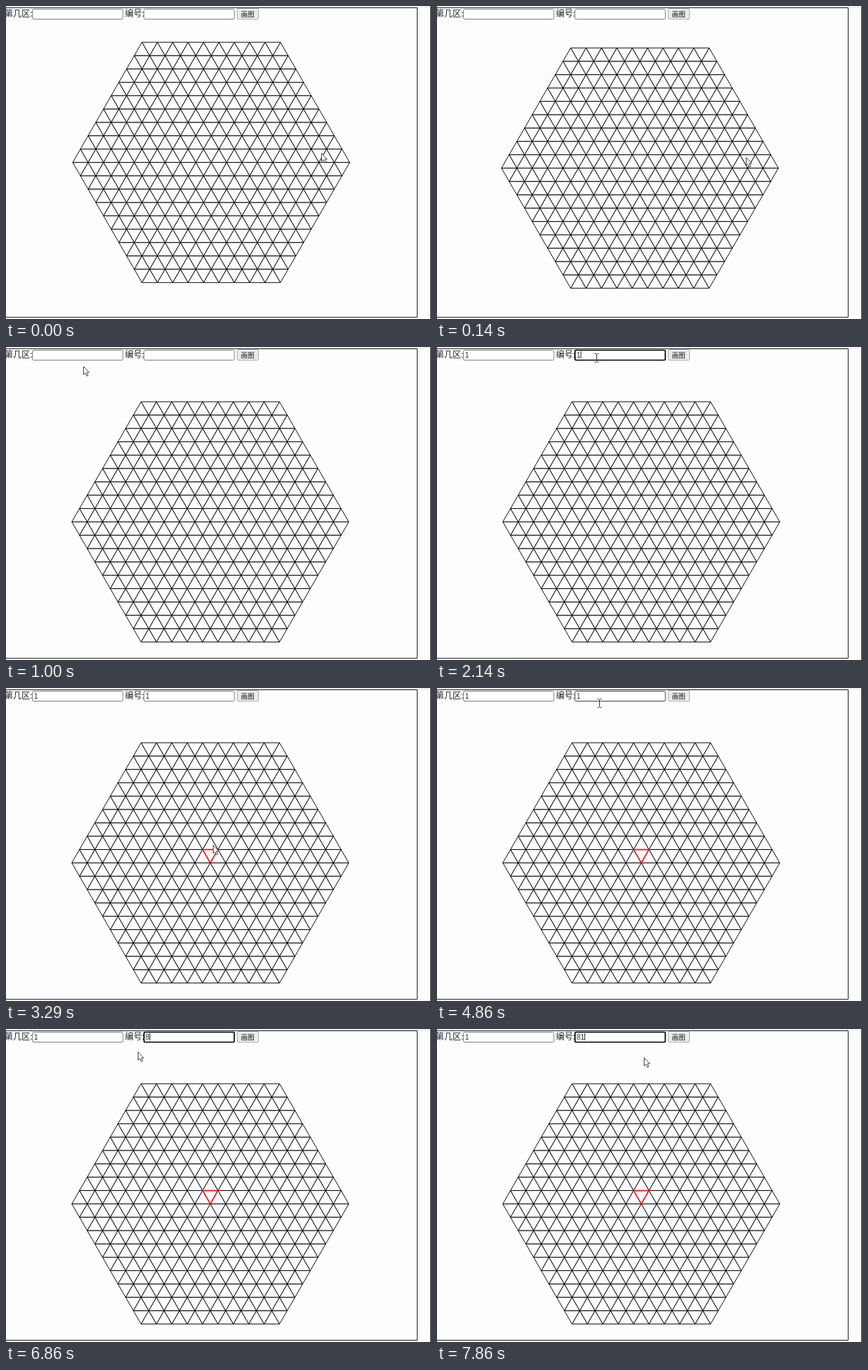
Animation, 600 px wide and 441 px high, one loop 8 s. Source, as an HTML page:

```html
<!DOCTYPE html>
<html lang="zh-CN">
<head>
<meta charset="utf-8">
<title>三角网格</title>
<style>
  html, body { margin: 0; width: 100%; height: 100%; overflow: hidden; background: #fefdfe; }
  svg { display: block; width: 600px; height: 441px; }
  text { font: 12px "Noto Sans CJK SC", "Noto Sans CJK", sans-serif; fill: #222; white-space: pre; }
  .value { font: 10px "Liberation Sans", Arial, sans-serif; fill: #333; }
  .small { font-size: 9.6px; font-weight: 500; fill: #111; }
  .frame { fill: none; stroke: #222; }
  .box { fill: #fff; stroke: #808080; }
  .box.hover { stroke: #444; }
  .box.focus { stroke: #000; stroke-width: 1.7; }
  .grid { fill: none; stroke: #000; stroke-width: .95; }
</style>
</head>
<body>
<svg viewBox="0 0 600 441">
  <path d="M0 2H580V438H0Z" fill="#fdfcfe"/>
  <path d="M357 1.5H598" stroke="#e2e2e2"/>
  <path class="frame" d="M0 2.5H580.5V438.5H0M599.5 0V441"/>

  <g id="mesh">
    <path class="grid" id="lines"/>
    <path class="grid" id="inner" opacity=".5"/>
    <path id="marked" fill="none" stroke="#f01c1c" stroke-width="1.6"/>
  </g>

  <text x="-2" y="15">第几区:</text>
  <rect class="box" x="37.5" y="4.5" width="127.5" height="14" rx="1.5"/>
  <text class="value" x="39.5" y="14.5"></text>
  <text x="168" y="15">编号:</text>
  <rect class="box" x="194.8" y="4.5" width="127.5" height="14" rx="1.5"/>
  <text class="value" x="197" y="14.5"></text>
  <path id="caret" d="M0 6V16" stroke="#222"/>
  <rect x="326.5" y="3.5" width="30" height="15" rx="1.5" fill="#ebebed" stroke="#b0b0b0"/>
  <text class="small" x="331.5" y="14.5">画图</text>

  <g id="pointer">
    <path id="arrow" d="M.5 .5V12L3 9.7 5 14 6.9 13.1 5 8.9H8.4Z" fill="#fff" stroke="#333" stroke-width=".9"/>
    <path id="beam" d="M-2.5-5.5H-.5L.5-4.5 1.5-5.5H3.5M.5-4.5V5.5M-2.5 6.5H-.5L.5 5.5 1.5 6.5H3.5" fill="none" stroke="#333"/>
  </g>
</svg>
<script>
const LOOP = 8000, FPS = 7, LAST = 55, DRAG_END = 4;
const SIDE = 21.72, ROW = SIDE * Math.sqrt(3) / 2, ROWS = 9;
const byId = id => document.getElementById(id);
const boxes = [...document.querySelectorAll('.box')];
const values = document.querySelectorAll('.value');

const points = {
  grab: { x: 445, y: 207 }, swing: { x: 431, y: 219 }, drop: { x: 437, y: 231 },
  below: { x: 109, y: 27 }, first: { x: 100, y: 16 }, second: { x: 225, y: 15 },
  button: { x: 352, y: 12 }, triangle: { x: 292, y: 221 }, firstEnd: { x: 158, y: 16 },
  underSecond: { x: 229, y: 21 }, secondStart: { x: 186, y: 16 },
  aside: { x: 186, y: 32 }, rest: { x: 292, y: 40 }
};
const meshDrag = [{ x: 289.7, y: 220.4 }, { x: 285.2, y: 235.4 }, { x: 288.4, y: 246.4 }];

// Pointer moves after the drag: first step, last step, destination
const moves = [
  [4, 7, 'below'], [7, 8, 'first'], [12, 15, 'second'], [15, 18, 'button'],
  [20, 23, 'triangle'], [27, 31, 'firstEnd'], [32, 34, 'underSecond'],
  [34, 37, 'secondStart'], [39, 42, 'aside'], [51, 55, 'rest']
];

const clamp = u => Math.max(0, Math.min(1, u));
const ease = u => u * u * (3 - 2 * u);
const mix = (a, b, u) => ({ x: a.x + (b.x - a.x) * u, y: a.y + (b.y - a.y) * u });

// Parabola from a to b that passes through m halfway
function arc([a, m, b], u) {
  const straight = mix(a, b, u), bend = 4 * u * (1 - u), centre = mix(a, b, .5);
  return { x: straight.x + bend * (m.x - centre.x), y: straight.y + bend * (m.y - centre.y) };
}

function pointerAt(step) {
  const start = arc([points.grab, points.swing, points.drop], clamp(step / DRAG_END));
  return moves.reduce(
    (from, [first, last, name]) => mix(from, points[name], ease(clamp((step - first) / (last - first)))),
    start);
}

function focusAt(step) {
  if (step >= 8 && step < 14) return 0;
  return step >= 14 && step < 18 || step >= 35 ? 1 : -1;
}

function typedAt(step) {
  const first = step < 11 ? '' : '1';
  const second = step < 15 ? '' : step < 41 ? '1' : '81'.slice(0, step < 51 ? 1 : 2);
  return [first, second];
}

// Parallel rows of a hexagon, repeated in three directions
function meshLines(limit) {
  let d = '';
  for (let turn = 0; turn < 3; turn++) {
    const c = Math.cos(turn * Math.PI / 3), s = Math.sin(turn * Math.PI / 3);
    const at = (x, y) => `${(x * c - y * s).toFixed(2)} ${(x * s + y * c).toFixed(2)}`;
    for (let k = -limit; k <= limit; k++) {
      const half = (2 * ROWS - Math.abs(k)) * SIDE / 2;
      d += `M${at(-half, k * ROW)}L${at(half, k * ROW)}`;
    }
  }
  return d;
}

byId('lines').setAttribute('d', meshLines(ROWS));
byId('inner').setAttribute('d', meshLines(ROWS - 1));
byId('marked').setAttribute('d', `M0 0L${-SIDE / 2} ${-ROW}H${SIDE / 2}Z`);

const place = (id, { x, y }) => byId(id).setAttribute('transform', `translate(${x} ${y})`);
const show = (id, on) => byId(id).setAttribute('visibility', on ? 'visible' : 'hidden');

function draw(now) {
  const step = Math.min(LAST, Math.floor((now % LOOP + 5) * FPS / 1000));
  const { x, y } = pointerAt(step);
  const focus = focusAt(step), typed = typedAt(step);
  const hovered = boxes.findIndex(box => {
    const left = box.x.baseVal.value;
    return y < 23 && x > left && x < left + box.width.baseVal.value;
  });

  boxes.forEach((box, i) => {
    box.classList.toggle('hover', i === hovered);
    box.classList.toggle('focus', i === focus);
    values[i].textContent = typed[i];
  });

  if (focus >= 0) {
    const left = values[focus].x.baseVal[0].value;
    place('caret', { x: left + .5 + typed[focus].length * 5.6, y: 0 });
  }
  show('caret', focus >= 0);
  show('marked', step >= 18);
  show('arrow', hovered < 0);
  show('beam', hovered >= 0);
  place('pointer', { x: Math.round(x), y: Math.round(y) });
  place('mesh', arc(meshDrag, clamp(step / DRAG_END)));
}

const start = performance.now();
function tick() {
  draw(performance.now() - start);
  requestAnimationFrame(tick);
}
tick();
</script>
</body>
</html>
```
